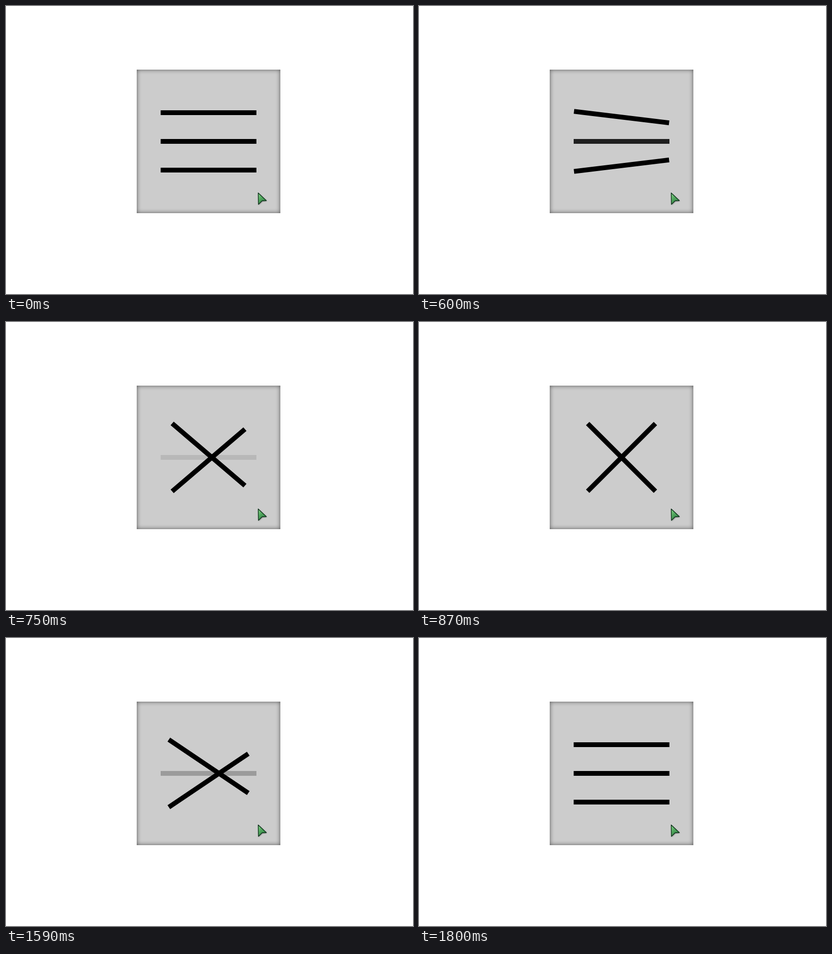
Write an HTML page that moves like this. It is 850 by 602 pixels and loops after 2.12 s.

```html
<!DOCTYPE html>
<html lang="en">
<head>
<meta charset="utf-8">
<title>Menu toggle</title>
<style>
  html, body { margin: 0; width: 100%; height: 100%; overflow: hidden; background: #fff; }
  .button {
    position: absolute; left: 273px; top: 133px; width: 300px; height: 300px;
    background: #ccc; box-shadow: inset 0 0 10px #555;
  }
  svg { position: absolute; left: 0; top: 0; }
</style>
</head>
<body>
<div class="button"></div>
<svg width="850" height="602" viewBox="0 0 850 602">
  <defs>
    <linearGradient id="green" x1="0" y1="0" x2="0.7" y2="1">
      <stop offset="0.1" stop-color="#7ccb80"/>
      <stop offset="0.5" stop-color="#4fa45c"/>
      <stop offset="1" stop-color="#2f7d42"/>
    </linearGradient>
    <filter id="soft" x="-50%" y="-50%" width="200%" height="200%">
      <feGaussianBlur stdDeviation="1.3"/>
    </filter>
  </defs>
  <rect id="top" x="-100" y="-5" width="200" height="10"/>
  <rect id="middle" x="323" y="278" width="200" height="10"/>
  <rect id="bottom" x="-100" y="-5" width="200" height="10"/>
  <path d="M527 391L545 408L536 408.500L528 416Z" opacity="0.4" filter="url(#soft)"/>
  <path d="M526.700 390.700L543.800 406.800L534.800 407.200L527.200 414.700Z"
        fill="url(#green)" stroke="#0b3018" stroke-width="1.400" stroke-linejoin="round"/>
  <circle id="click" cx="526" cy="390" r="12" fill="#ff0" fill-opacity="0.5"/>
</svg>
<script>
  const LOOP = 2120, STEP = 30;
  const [top_, middle, bottom, click] =
    ["top", "middle", "bottom", "click"].map(id => document.getElementById(id));

  // CSS "ease": cubic-bezier(.25, .1, .25, 1)
  function ease(x) {
    if (x <= 0) return 0;
    if (x >= 1) return 1;
    let lo = 0, hi = 1;
    for (let i = 0; i < 24; i++) {
      const u = (lo + hi) / 2;
      if (0.75 * u * (1 - u) + u ** 3 < x) lo = u; else hi = u;
    }
    const v = 1 - lo;
    return 0.3 * lo * v * v + 3 * lo * lo * v + lo ** 3;
  }

  // 0 = three bars, 1 = cross; the pose advances in fixed steps
  function openness(t) {
    const q = Math.floor(t / STEP) * STEP;
    if (t < 600 || t >= 1800) return 0;
    if (t < 870) return ease((q - 559) / 306);
    if (t < 1550) return 1;
    return 1 - ease((Math.max(q, 1560) - 1542) / 270);
  }

  function placeBar(bar, side, p) {
    const y = 283 - side * 60 * (1 - p);
    bar.setAttribute("transform", `translate(423 ${y}) rotate(${side * 45 * p})`);
  }

  function draw(t) {
    const p = openness(t);
    placeBar(top_, 1, p);
    placeBar(bottom, -1, p);
    middle.setAttribute("opacity", 1 - p);
    const pressed = (t >= 470 && t < 600) || (t >= 1440 && t < 1550);
    click.setAttribute("visibility", pressed ? "visible" : "hidden");
  }

  const start = performance.now();
  function tick() {
    draw((performance.now() - start) % LOOP);
    requestAnimationFrame(tick);
  }
  draw(0);
  requestAnimationFrame(tick);
</script>
</body>
</html>
```
